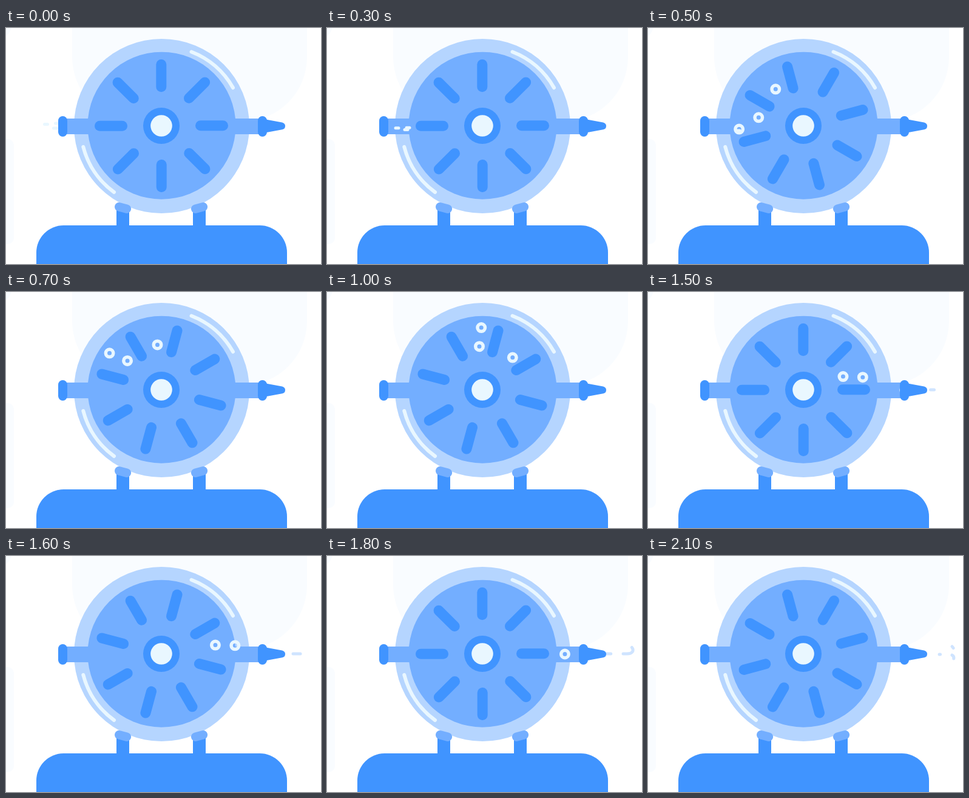
Animation of 519 by 391 pixels, one loop 2200 ms. Source, as an HTML page:

```html
<!DOCTYPE html>
<html lang="en">
<head>
<meta charset="utf-8">
<title>Bubble wheel</title>
<style>
  html, body { margin: 0; width: 100%; height: 100%; overflow: hidden; background: #fff; }
  svg { display: block; }
  .strong { fill: #4094ff; }
  .mid { fill: #73aeff; }
  .soft { fill: #f9fcff; }
  .line { fill: none; stroke: #e9f7ff; stroke-linecap: round; }
  .jet { fill: none; stroke: #cfe4ff; stroke-width: 5; stroke-linecap: round; }
</style>
</head>
<body>
<svg width="519" height="391" viewBox="0 0 519 391">
  <defs>
    <clipPath id="inside"><rect x="86" y="0" width="336" height="391"/></clipPath>
  </defs>
  <rect class="soft" x="109" y="-160" width="387" height="315" rx="107"/>
  <rect class="soft" x="-40" y="184" width="53" height="174" rx="10"/>
  <circle class="soft" cx="-12" cy="-4" r="21"/>

  <circle cx="256.5" cy="162.5" r="144.5" fill="#b5d5ff"/>
  <circle class="mid" cx="256.5" cy="161.7" r="122"/>
  <rect class="mid" x="98" y="150" width="42" height="26"/>
  <rect class="mid" x="374" y="150" width="46" height="26"/>
  <path class="line" stroke-width="6" d="M305.5 39.5A134 134 0 0 1 374 99M127.3 197A134 134 0 0 0 178 272"/>

  <g id="spokes" class="strong"></g>
  <circle class="strong" cx="256" cy="162" r="30"/>
  <circle cx="256" cy="162" r="17.8" fill="#e9f7ff"/>

  <g id="streaks" class="line" stroke-width="5"></g>
  <g id="bubbles" class="line" stroke-width="5.5" clip-path="url(#inside)"></g>
  <g id="jets"></g>

  <rect class="strong" x="86" y="146" width="15" height="34" rx="7.5"/>
  <rect class="strong" x="415" y="146" width="15" height="34" rx="7.5"/>
  <path class="strong" d="M428 151.5L455 156.6Q460 158 460 162.5Q460 167 455 168.2L428 173.3Z"/>

  <path class="strong" d="M182 298h21v32h-21zM308 298h21v32h-21z"/>
  <rect class="mid" x="178.8" y="290.8" width="27.5" height="14.5" rx="7" transform="rotate(15 192.5 298)"/>
  <rect class="mid" x="304.8" y="290.8" width="27.5" height="14.5" rx="7" transform="rotate(-15 318.5 298)"/>
  <rect class="strong" x="50" y="327" width="413" height="140" rx="45"/>
</svg>
<script>
const LOOP = 2200, STEP = 100;
const HUB = { x: 256, y: 162 };
const byId = id => document.getElementById(id);

function set(el, attrs) {
  for (const key in attrs) el.setAttribute(key, attrs[key]);
  return el;
}

function add(parent, tag, attrs = {}) {
  const el = document.createElementNS('http://www.w3.org/2000/svg', tag);
  parent.appendChild(el);
  return set(el, attrs);
}

const show = (el, on) => set(el, { visibility: on ? 'visible' : 'hidden' });
const mix = (a, b, k) => a + (b - a) * k;

for (let i = 0; i < 8; i++) {
  add(byId('spokes'), 'rect', {
    x: 247.3, y: 52, width: 17, height: 54, rx: 8.5, transform: `rotate(${i * 45} ${HUB.x} ${HUB.y})`
  });
}

// Drops stream in as streaks, circle the hub as bubbles, then drift out through the right pipe.
// The angle is the one reached at step 10; times are in steps.
const drops = [
  { x: 84, y: 158, enter: 4, leave: 10, angle: 313, speed: 16, brake: 0, radius: 73 },
  { x: 81, y: 166, enter: 4, leave: 15, angle: 266, speed: 15.1, brake: 0, radius: 72 },
  { x: 66, y: 159.5, enter: 5, leave: 15, angle: 269, speed: 17.1, brake: 0.26, radius: 103 }
].map(drop => ({
  ...drop,
  streak: add(byId('streaks'), 'path'),
  bubble: add(byId('bubbles'), 'circle', { r: 6.25 })
}));

function orbit(drop, n) {
  const k = n - 10;
  const a = (drop.angle + drop.speed * k - drop.brake * k * k) * Math.PI / 180;
  const r = drop.radius - 0.6 * k;
  return { x: HUB.x + r * Math.cos(a), y: HUB.y + r * Math.sin(a) };
}

function bubbleAt(drop, n) {
  const age = Math.max(0, n - drop.leave);
  const p = orbit(drop, n - age);
  return { x: p.x + 23.5 * age, y: mix(p.y, 162.5, Math.min(1, age / 3)) };
}

// The tail runs along the path at a steady speed; the head is ahead by a gap that may grow.
const jets = [
  { d: 'M458 162H494C504 162 507 156 501 150', start: 14, speed: 7.5, gap: 0, grow: 6 },
  { d: 'M458 162H488C502 162 507 166 502 174', start: 17.8, speed: 13.5, gap: 7, grow: 0 },
  { d: 'M458 163H494', start: 19, speed: 11, gap: 1.5, grow: 0 }
].map(jet => {
  const el = add(byId('jets'), 'path', { class: 'jet', d: jet.d });
  return { ...jet, el, length: el.getTotalLength() };
});

function drawDrop(drop, n) {
  const { streak, bubble, enter } = drop;
  const x = drop.x + 16.5 * n, y = mix(drop.y, 170, n / 5);
  show(streak, n <= enter);
  set(streak, { d: `M${x - 2.5} ${y}h5` });

  const p = bubbleAt(drop, n);
  show(bubble, n >= enter && p.x < 430);
  set(bubble, { cx: p.x, cy: p.y });
}

function drawJet({ el, start, speed, gap, grow, length }, n) {
  const age = n - start;
  show(el, age > 0);
  const tail = Math.min(speed * age, length - 0.1);
  const head = Math.min(tail + gap + grow * age, length);
  set(el, { 'stroke-dasharray': `${head - tail} 200`, 'stroke-dashoffset': -tail });
}

function draw(n) {
  // The wheel rests for one step near the end of the loop.
  const turn = 15 * (n < 20 ? n : n - 1);
  set(byId('spokes'), { transform: `rotate(${turn % 45} ${HUB.x} ${HUB.y})` });
  drops.forEach(drop => drawDrop(drop, n));
  jets.forEach(jet => drawJet(jet, n));
}

const start = performance.now();
function tick() {
  draw(Math.floor((performance.now() - start) % LOOP / STEP));
  requestAnimationFrame(tick);
}
tick();
</script>
</body>
</html>
```
